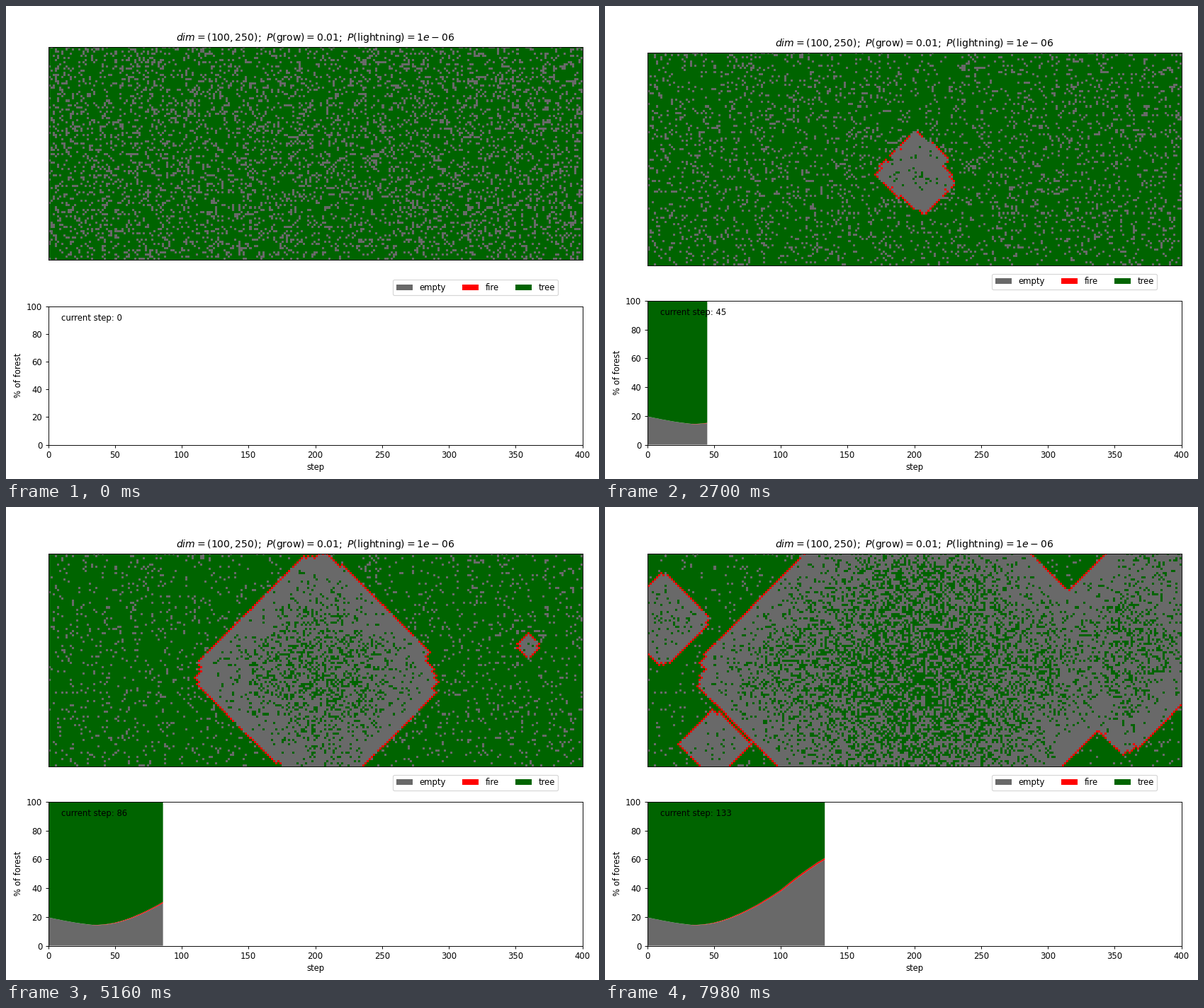
A matplotlib script for the animation above (8 s loop, 837x669 px).

```python
import numpy as np
import matplotlib.pyplot as plt
from matplotlib.animation import FuncAnimation
from matplotlib.colors import to_rgb
from matplotlib.patches import Patch

W, H, DPI = 837, 669, 83.625
ROWS, COLS = 100, 250
STEPS = 134
P_GROW = 0.01
EMPTY, FIRE, TREE = range(3)
NAMES = ["empty", "fire", "tree"]
COLORS = ["dimgray", "red", "darkgreen"]
PALETTE = np.array([to_rgb(c) for c in COLORS])

# step of each lightning strike -> (row, column)
STRIKES = {23: (56, 127), 80: (43, 224), 105: (2, 240),
           110: (31, 7), 116: (89, 31)}

plt.rcParams["font.family"] = "DejaVu Sans"


def near_fire(forest):
    burning = np.pad(forest == FIRE, 1)
    return (burning[:-2, 1:-1] | burning[2:, 1:-1]
            | burning[1:-1, :-2] | burning[1:-1, 2:])


def simulate():
    rng = np.random.default_rng(12)
    forest = np.where(rng.random((ROWS, COLS)) < 0.8, TREE, EMPTY)
    history = [forest]
    for step in range(1, STEPS):
        nxt = forest.copy()
        nxt[forest == FIRE] = EMPTY
        nxt[(forest == TREE) & near_fire(forest)] = FIRE
        grows = rng.random(forest.shape) < P_GROW
        nxt[(forest == EMPTY) & grows] = TREE
        if step in STRIKES:
            nxt[STRIKES[step]] = FIRE
        forest = nxt
        history.append(forest)
    return history


def place(ax, top, bottom, left=59.5, right=813.5):
    ax.set_position([left / W, 1 - bottom / H,
                     (right - left) / W, (bottom - top) / H])


history = simulate()
shares = np.array([[100 * np.mean(f == kind) for f in history]
                   for kind in (EMPTY, FIRE, TREE)])

fig = plt.figure(figsize=(W / DPI, H / DPI), dpi=DPI, facecolor="white")
top_ax = fig.add_axes([0.1, 0.5, 0.8, 0.4])
low_ax = fig.add_axes([0.1, 0.1, 0.8, 0.3])

image = top_ax.imshow(PALETTE[history[0]], aspect="auto",
                      interpolation="nearest")
top_ax.set_xticks([])
top_ax.set_yticks([])
top_ax.set_title(r"$dim = (100, 250);\ P(\mathrm{grow}) = 0.01;"
                 r"\ P(\mathrm{lightning}) = 1e-06$", fontsize=12, pad=7.4)

low_ax.set_xlim(0, 400)
low_ax.set_ylim(0, 100)
low_ax.set_xlabel("step")
low_ax.set_ylabel("% of forest")
low_ax.legend(handles=[Patch(facecolor=c, label=n)
                       for c, n in zip(COLORS, NAMES)],
              loc="lower center", bbox_to_anchor=(0.8, 1.05), ncol=3)
counter = low_ax.text(10, 90, "")


def update(i):
    step = (2 * i + 1) // 3  # 40 ms ticks, one step every 60 ms
    shift = 8 if step == 0 else 0  # the layout tightens after the first step
    place(top_ax, 65.5 - shift, 367.1 - shift)
    place(low_ax, 417 + shift, 620.5)
    image.set_data(PALETTE[history[step]])
    counter.set_text(f"current step: {step}")
    for band in list(low_ax.collections):
        band.remove()
    if step:
        low_ax.stackplot(np.arange(step + 1), shares[:, :step + 1],
                         colors=COLORS)


anim = FuncAnimation(fig, update, frames=200, interval=40, repeat=True)
plt.show()
```
